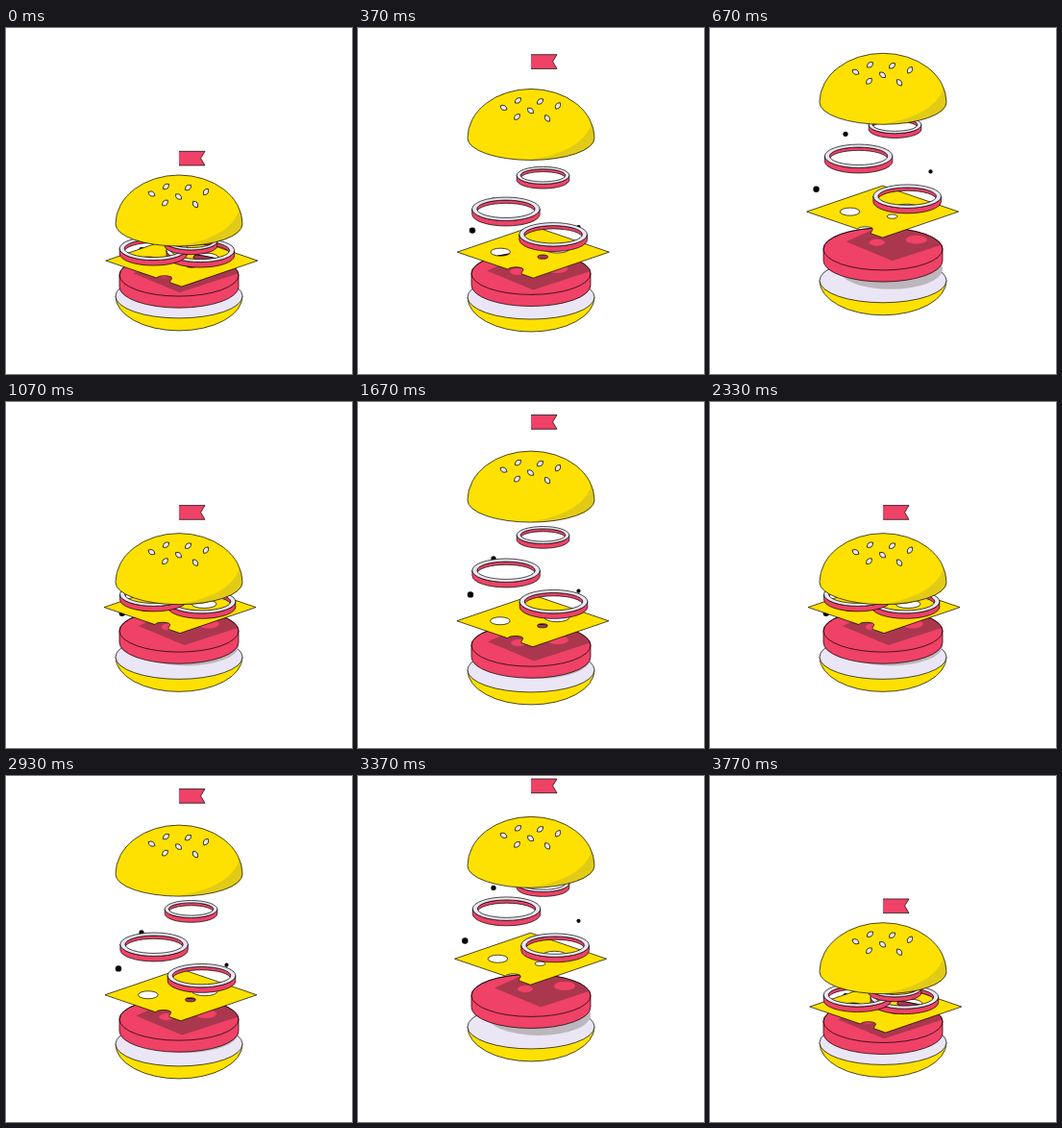
An HTML page for the animation above (3810 ms loop, 360 by 360 pixels).

```html
<!DOCTYPE html>
<html lang="en">
<head>
<meta charset="utf-8">
<title>Jumping burger</title>
<style>
  html, body { margin: 0; width: 100%; height: 100%; overflow: hidden; background: #fff; }
  svg { display: block; width: 100vw; height: 100vh; }
  .line { stroke: #000; stroke-width: .7; stroke-linejoin: round; }
  .yellow { fill: #fee100; }
  .pink { fill: #ef4266; }
  .cream { fill: #ebe6f5; }
  .dark { fill: #ab374f; }
</style>
</head>
<body>
<svg id="stage" viewBox="0 0 360 360" preserveAspectRatio="xMidYMid meet">
  <defs>
    <clipPath id="pattyTop"><ellipse cx="180" cy="259.9" rx="62" ry="22"/></clipPath>
    <clipPath id="dome"><path d="M114 204A66 51 0 0 1 246 204A66 23 0 0 1 114 204Z"/></clipPath>
  </defs>

  <g id="base">
    <path class="yellow line" d="M114 281.9A66 36 0 0 0 246 281.9Z"/>
    <ellipse class="cream line" cx="180" cy="281.9" rx="66" ry="23"/>
    <ellipse cx="188" cy="269.9" rx="54" ry="21" fill="#bdb6bd"/>
  </g>

  <g id="patty">
    <path class="pink line" d="M118 259.9A62 22 0 0 1 242 259.9V272A62 22 0 0 1 118 272Z"/>
    <g clip-path="url(#pattyTop)">
      <g id="shade">
        <path class="dark" d="M142 251.9L190 271.9L270 245.9L200 225.9Z"/>
        <ellipse class="pink" cx="174" cy="252.9" rx="8" ry="3.5"/>
        <ellipse class="pink" cx="215" cy="249.9" rx="11" ry="4.5"/>
      </g>
    </g>
    <ellipse class="line" cx="180" cy="259.9" rx="62" ry="22" fill="none"/>
  </g>

  <circle id="crumbA" cx="125.5" cy="243.5" r="3.2" fill="#000"/>
  <circle id="crumbB" cx="141" cy="232" r="2.6" fill="#000"/>
  <circle id="crumbC" cx="229.5" cy="233.5" r="2.1" fill="#000"/>

  <path id="cheese" class="yellow line" fill-rule="evenodd"/>
  <g id="ringA"></g>
  <g id="ringB"></g>
  <g id="ringC"></g>

  <g id="bun">
    <path class="yellow" d="M114 204A66 51 0 0 1 246 204A66 23 0 0 1 114 204Z"/>
    <path clip-path="url(#dome)" fill="#e2cb16" d="M244 186C238 207 219 220 178 227L250 232Z"/>
    <path class="line" fill="none" d="M114 204A66 51 0 0 1 246 204A66 23 0 0 1 114 204Z"/>
    <g id="seeds" class="cream line"></g>
  </g>

  <path id="flag" class="pink line" d="M180 128.3H207L202.6 135.5L207 143H180"/>
</svg>

<script>
const FRAMES = 114, FRAME_MS = 1000 / 30, LOOP_MS = 3810;
const CYCLE = 38, HALF = CYCLE / 2;
const el = id => document.getElementById(id);

const oval = (x, y, rx, ry) =>
  `M${x - rx} ${y}a${rx} ${ry} 0 1 0 ${2 * rx} 0a${rx} ${ry} 0 1 0 ${-2 * rx} 0Z`;

// An onion ring: inner wall, outer wall, then the pale top face.
function ring(id, x, bottom, rx, ry, depth, rim) {
  const y = bottom - ry - depth, ix = rx - rim, iy = ry - rim * .6;
  const hole = oval(x, y, ix, iy);
  const inner = `M${x - ix} ${y}A${ix} ${iy} 0 0 1 ${x + ix} ${y}v${depth * .6}` +
    `A${ix} ${iy} 0 0 0 ${x - ix} ${y + depth * .6}Z`;
  const outer = `M${x - rx} ${y}v${depth}A${rx} ${ry} 0 0 0 ${x + rx} ${y + depth}v${-depth}` +
    `A${rx} ${ry} 0 0 1 ${x - rx} ${y}Z`;
  el(id).innerHTML = `<path class="pink line" d="${inner}"/><path class="pink line" d="${outer}"/>` +
    `<path class="cream line" fill-rule="evenodd" d="${oval(x, y, rx, ry)}${hole}"/>`;
}

// Walls must leave the middle of the ring open.
function openRing(id, x, bottom, rx, ry, depth, rim) {
  const y = bottom - ry - depth, ix = rx - rim, iy = ry - rim * .6, drop = depth * .6;
  const arc = (r, s, sweep, toX, toY) => `A${r} ${s} 0 0 ${sweep} ${toX} ${toY}`;
  const back = `M${x - ix} ${y}${arc(ix, iy, 1, x + ix, y)}v${drop}${arc(ix, iy, 0, x - ix, y + drop)}Z`;
  const front = `M${x - rx} ${y}v${depth}${arc(rx, ry, 0, x + rx, y + depth)}v${-depth}${arc(rx, ry, 1, x - rx, y)}Z`;
  const face = oval(x, y, rx, ry) + oval(x, y, ix, iy);
  el(id).innerHTML =
    `<path class="pink line" d="${back}"/>` +
    `<path class="pink line" d="${front.replace(arc(rx, ry, 1, x - rx, y), arc(rx, ry, 1, x - rx, y))}"/>` +
    `<path class="cream line" fill-rule="evenodd" d="${face}"/>`;
}
ring('ringA', 202.2, 250.7, 35.3, 12.2, 5.5, 5);
ring('ringB', 153.4, 248.2, 35.2, 12.2, 5.5, 5);
ring('ringC', 192.5, 236, 27.3, 9, 4.8, 4);

el('cheese').setAttribute('d',
  'M104 245L157 263C158 260 171 260 172.5 262.5C173.5 264.5 170 266 171 267.8L183 272L262 245L183 218Z' +
  oval(149, 245, 10.3, 4) + oval(193, 250, 5.3, 2.1) + oval(208, 241.5, 13, 4.4));

const seeds = [
  [151.5, 172.5, 30], [166.5, 165, -40], [189.5, 166, -40], [208, 170.5, -55],
  [179.5, 175.5, 40], [165.5, 182, -45], [197, 183.5, 55]
];
el('seeds').innerHTML = seeds.map(([x, y, turn]) =>
  `<path transform="translate(${x} ${y}) rotate(${turn})" d="M-4 0Q0 -5 4 0Q0 5 -4 0Z"/>`).join('');

// id, frame of the highest point, rise, sideways drift, ease strength
const parts = [
  ['flag', 19, 146, 0],
  ['bun', 19, 127, 0, .65],
  ['ringC', 20, 121.5, 0],
  ['ringB', 21, 97.5, 1.2],
  ['ringA', 22, 58.5, 3],
  ['cheese', 23, 55.4, -3.5],
  ['patty', 24, 31.6, 0],
  ['base', 25, 21, 0],
  ['crumbA', 21, 76, -15],
  ['crumbB', 21, 122, 0],
  ['crumbC', 22, 85, 0]
].map(([id, peak, rise, drift, power = .61]) => ({ node: el(id), peak, rise, drift, power }));

// cubic-bezier(power, 0, 1 - power, 1)
function ease(x, power) {
  let low = 0, high = 1;
  for (let i = 0; i < 24; i++) {
    const t = (low + high) / 2, r = 1 - t;
    const at = 3 * power * t * r * r + 3 * (1 - power) * t * t * r + t * t * t;
    if (at < x) low = t; else high = t;
  }
  return low * low * (3 - 2 * low);
}

// 1 at the peak, 0 at the lowest point
function lift(frame, peak, power) {
  const gap = Math.abs(frame - peak);
  return 1 - ease(Math.min(gap, CYCLE - gap) / HALF, power);
}

const move = (node, x, y) => node.setAttribute('transform', `translate(${x.toFixed(2)} ${y.toFixed(2)})`);

function draw(ms) {
  const step = Math.min(FRAMES - 1, Math.floor((ms % LOOP_MS + 5) / FRAME_MS));
  const frame = step % CYCLE;
  for (const { node, peak, rise, drift, power } of parts) {
    const up = lift(frame, peak, power);
    move(node, drift * up, -rise * up);
  }
  const press = 1 - lift(frame, 23, .61);
  move(el('shade'), -10 * press, 6.5 * press);
}

const start = performance.now();
function tick() {
  draw(performance.now() - start);
  requestAnimationFrame(tick);
}
tick();
</script>
</body>
</html>
```
